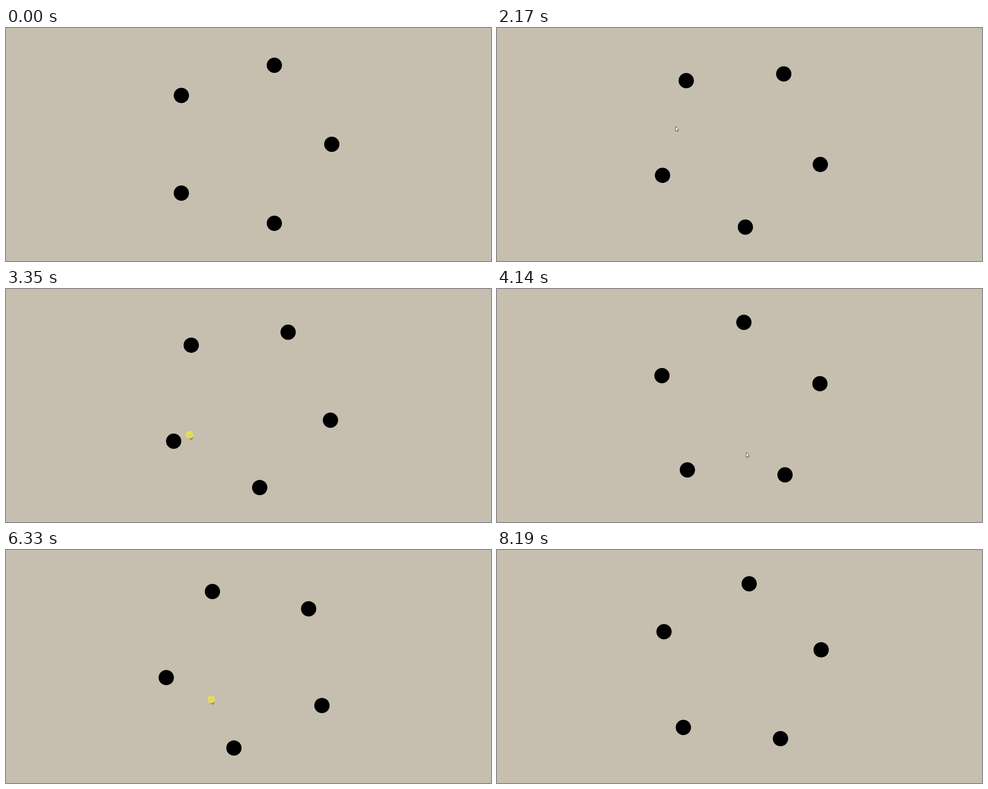
Recreate the animation shown at these times as an HTML page. Size 1079 by 519 pixels, loop 8280 ms.

```html
<!DOCTYPE html>
<html lang="en">
<head>
<meta charset="utf-8">
<title>Rotating dots</title>
<style>
  html, body { margin: 0; width: 100%; height: 100%; overflow: hidden; background: #c6beae; }
  svg { display: block; width: 100vw; height: 100vh; }
</style>
</head>
<body>
<svg viewBox="0 0 1079 519">
  <rect width="1079" height="519" fill="#c6beae"/>
  <g id="ring"></g>
  <g id="pointer">
    <path d="M0 0V10.2L2.4 8L4 11.4L5.6 10.7L4.1 7.4H7Z" fill="#fff" stroke="#222" stroke-width=".8"/>
    <circle id="press" r="8.5" fill="#e8e642" opacity=".8"/>
  </g>
</svg>
<script>
const LOOP = 8280, LAST = 8190;
const DOTS = 5, RADIUS = 17, ORBIT = 185, CENTER = { x: 539.8, y: 259 };
const SPEED = 0.06415; // degrees per ms
const PRESS_TIME = 75;
const VISIBLE = { from: 70, to: 7890 };

// The first click starts the ring counterclockwise, each later one reverses it.
const clicks = [950, 1114, 1834, 3383, 4305, 5079, 5225, 5739, 6300, 6370, 7415, 7852, 7989];

// Pointer stops
const stops = [
  { t: 70, x: 1014, y: 502 },
  { t: 700, x: 629, y: 132 },
  { t: 1300, x: 801, y: 240 },
  { t: 2170, x: 397.5, y: 219.5 },
  { t: 3350, x: 408.3, y: 324.5 },
  { t: 4140, x: 554.5, y: 364.5 },
  { t: 5310, x: 685.5, y: 328 },
  { t: 6330, x: 456.5, y: 332.5 },
  { t: 7800, x: 1043, y: 508 }
];

const ring = document.getElementById('ring');
const pointer = document.getElementById('pointer');
const press = document.getElementById('press');

const dots = Array.from({ length: DOTS }, () => {
  const dot = document.createElementNS('http://www.w3.org/2000/svg', 'circle');
  dot.setAttribute('r', RADIUS);
  return ring.appendChild(dot);
});

const clamp = (v, min, max) => Math.min(max, Math.max(min, v));
const lerp = (a, b, k) => a + (b - a) * k;
const smooth = k => k * k * (3 - 2 * k);
const show = (element, visible) => { element.style.display = visible ? '' : 'none'; };

function ringAngle(t) {
  return clicks.reduce((angle, start, i) => {
    const end = clicks[i + 1] ?? LAST;
    const direction = i % 2 ? 1 : -1;
    return angle + direction * SPEED * (clamp(t, start, end) - start);
  }, 0);
}

function pointerTip(t) {
  const next = clamp(stops.findIndex(stop => stop.t > t), 1, stops.length - 1);
  const a = stops[next - 1], b = stops[next];
  const k = smooth(clamp((t - a.t) / (b.t - a.t), 0, 1));
  return { x: lerp(a.x, b.x, k), y: lerp(a.y, b.y, k) };
}

function draw(time) {
  const t = Math.min(time, LAST);
  const angle = ringAngle(t);
  dots.forEach((dot, i) => {
    const a = (angle + i * 360 / DOTS) * Math.PI / 180;
    dot.setAttribute('cx', CENTER.x + ORBIT * Math.cos(a));
    dot.setAttribute('cy', CENTER.y + ORBIT * Math.sin(a));
  });

  const inside = t >= VISIBLE.from && t < VISIBLE.to;
  show(pointer, inside);
  if (!inside) return;
  const tip = t >= stops[stops.length - 1].t ? stops[stops.length - 1] : pointerTip(t);
  pointer.setAttribute('transform', `translate(${tip.x} ${tip.y})`);
  show(press, clicks.some(click => Math.abs(t - click - 15) < PRESS_TIME));
}

const begin = performance.now();
function tick() {
  draw((performance.now() - begin) % LOOP);
  requestAnimationFrame(tick);
}
tick();
</script>
</body>
</html>
```
